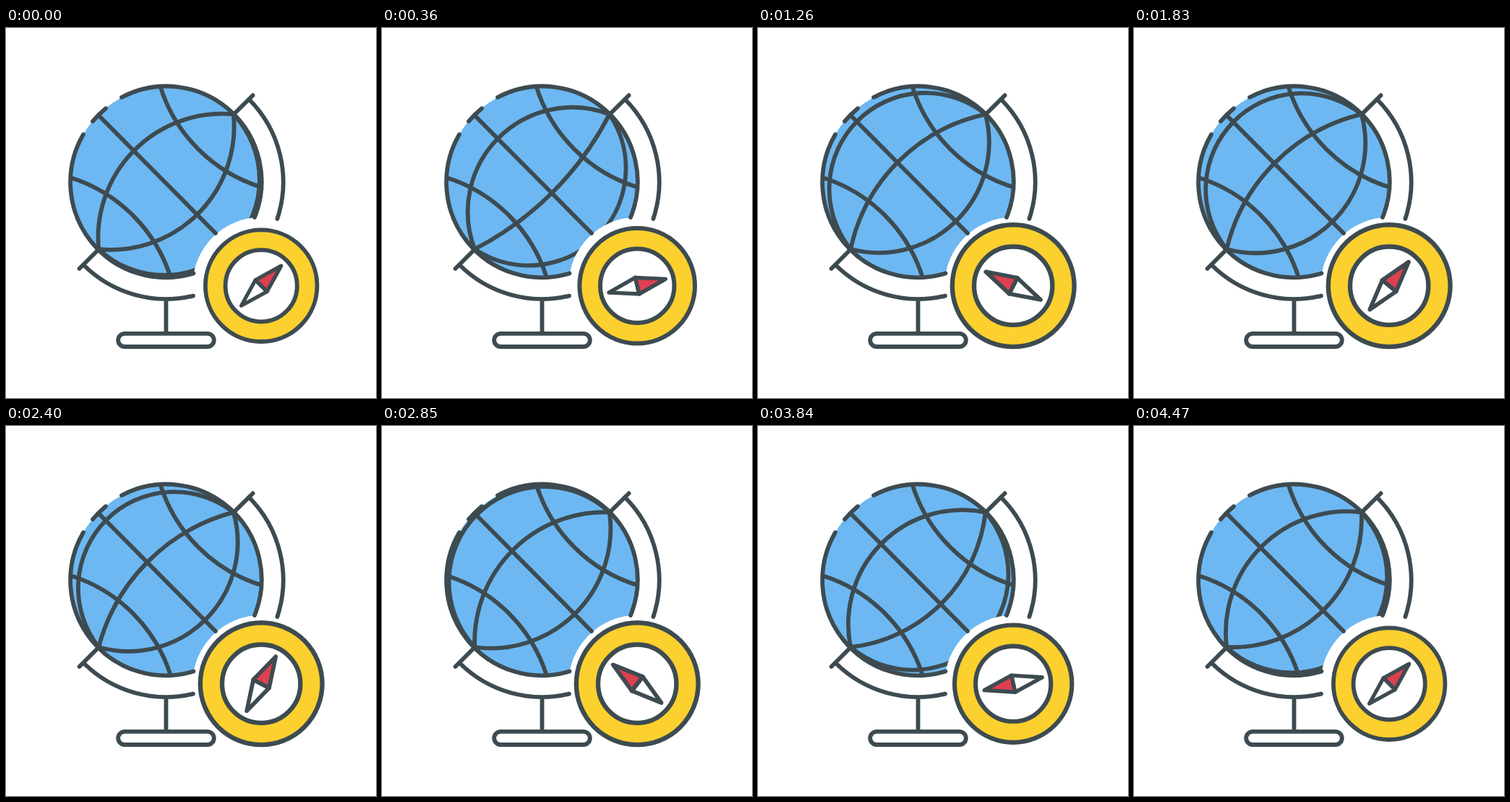
An HTML page that plays this animation: 512x512 px, repeating every 4.5 s.

```html
<!DOCTYPE html>
<html lang="en">
<head>
<meta charset="utf-8">
<title>Globe and compass</title>
<style>
  html, body { margin: 0; width: 100%; height: 100%; overflow: hidden; background: #fff; }
  svg { display: block; width: 100vw; height: 100vh; }
  .line { fill: none; stroke: #3d4b51; stroke-width: 5.8; stroke-linecap: round; stroke-linejoin: round; }
</style>
</head>
<body>
<svg viewBox="0 0 512 512">
  <defs>
    <mask id="cut" maskUnits="userSpaceOnUse" x="0" y="0" width="512" height="512">
      <circle cx="221.5" cy="212.9" r="134" fill="#fff"/>
      <circle cx="353.2" cy="356.7" r="95" fill="#000"/>
    </mask>
  </defs>

  <g mask="url(#cut)">
    <circle cx="221.5" cy="212.9" r="132" fill="#6db8f2"/>
    <g class="line" id="meridians"><path/><path/><path/></g>
  </g>

  <g class="line">
    <!-- parallels and equator -->
    <path d="M214 82.3A212 212 0 0 0 352.7 220M90 207.2A212 212 0 0 1 227.8 345M129 121.7L290 284"/>
    <!-- globe outline -->
    <path d="M160 96A131.8 131.8 0 0 1 344 262M107 147.2A131.8 131.8 0 0 0 259.5 339.5M120 129.2A131.8 131.8 0 0 1 138 111.2"/>
    <!-- axis, bracket and foot -->
    <path d="M315 119.5L341.6 93.2M128 306.5L101.5 333"/>
    <path d="M336.3 98.7A161.7 161.7 0 0 1 375.4 264M107.5 328A161.7 161.7 0 0 0 259 370.6M221.5 376V422"/>
    <rect x="155.2" y="422.9" width="132.6" height="18.1" rx="9.05"/>
  </g>

  <g id="compass">
    <circle class="line" r="77.3" style="fill:#fbd02f"/>
    <circle class="line" r="49.6" style="fill:#fff"/>
    <g id="needle" class="line" style="stroke-width:5.2">
      <path d="M0 39L11.3 0H-11.3Z" fill="#fff"/>
      <path d="M0 -39L11.3 0H-11.3Z" fill="#dd4050"/>
    </g>
  </g>
</svg>
<script>
  const LOOP = 4500, SPINS = 8, R = 132;
  const STOPS = [-R, -61.5, 63.5, R];
  const lines = document.querySelectorAll('#meridians path');
  const compass = document.getElementById('compass');
  const needle = document.getElementById('needle');

  const mix = (a, b, u) => a + (b - a) * u;
  const smooth = u => u * u * (3 - 2 * u);
  const ramp = (t, a, b) => smooth(Math.min(1, Math.max(0, (t - a) / (b - a))));

  // arc between the poles, bulging by b across the axis
  function meridian(b) {
    const h = Math.max(0.1, Math.abs(b));
    const r = (R * R + h * h) / (2 * h);
    return `M128.2 306A${r} ${r} 0 0 ${b < 0 ? 1 : 0} 314.8 119.4`;
  }

  function needleAngle(t) {
    return 45 + 360 * ramp(t, 0, 1980)
      - 112 * ramp(t, 2190, 3050)
      + 472 * ramp(t, 3050, 4310);
  }

  function draw(t) {
    const u = (t - 8 + LOOP) / LOOP * SPINS % 1;
    const e = mix(u, smooth(u), 0.5);
    lines.forEach((p, i) => p.setAttribute('d', meridian(mix(STOPS[i], STOPS[i + 1], e))));

    const s = 1 + 0.092 * (ramp(t, 0, 900) - ramp(t, 3420, 4320));
    compass.setAttribute('transform', `translate(353.2 356.7) scale(${s})`);
    needle.setAttribute('transform', `rotate(${needleAngle(t)})`);
  }

  const start = performance.now();
  function tick() {
    draw((performance.now() - start) % LOOP);
    requestAnimationFrame(tick);
  }
  draw(0);
  requestAnimationFrame(tick);
</script>
</body>
</html>
```
